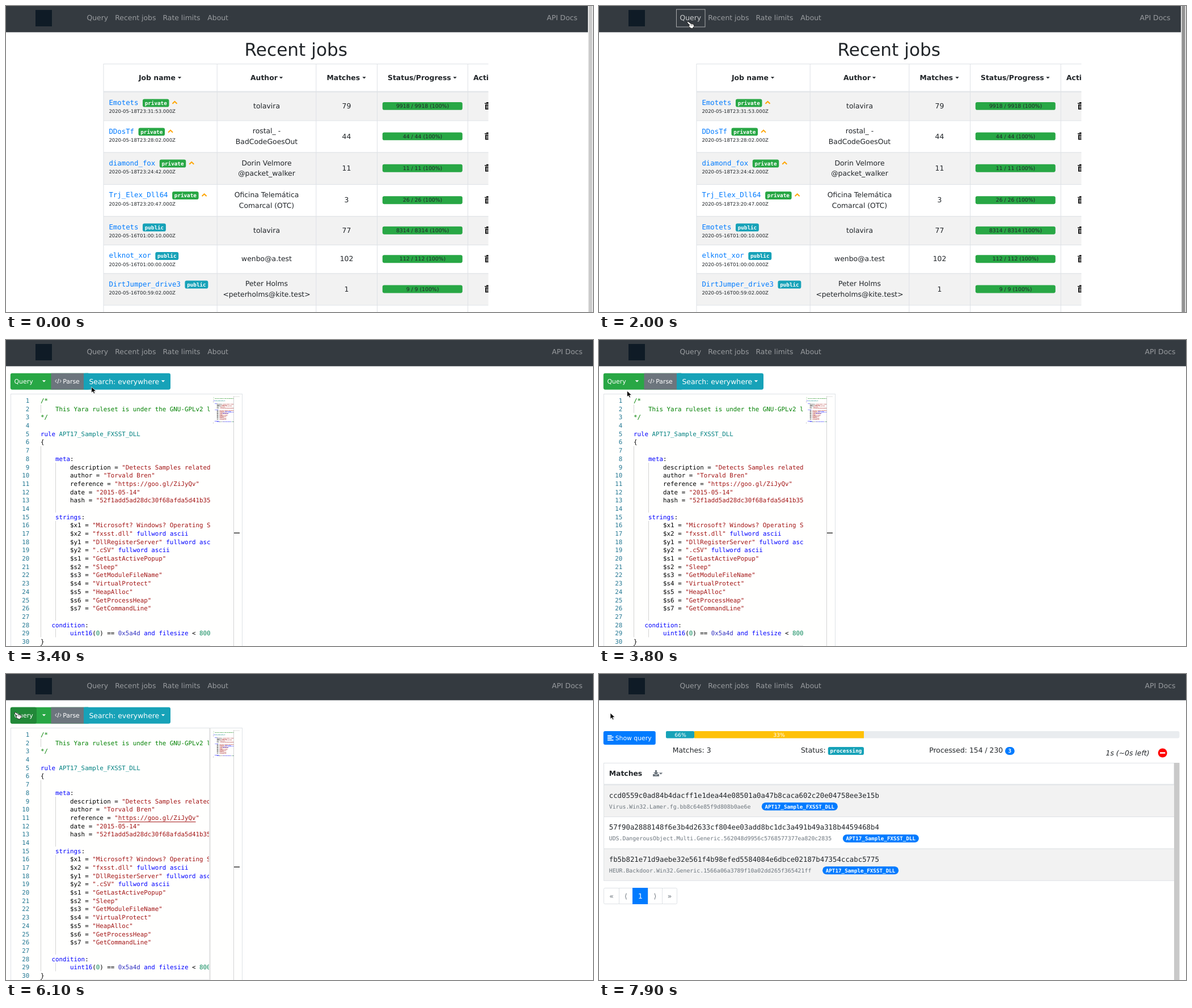
Animation of 1035x541 px, one loop 8 s. Source, as an HTML page:

```html
<!DOCTYPE html>
<html lang="en">
<head>
<meta charset="utf-8">
<title>Query demo</title>
<style>
html, body { margin: 0; width: 100%; height: 100%; overflow: hidden; background: #fff; }
svg { display: block; width: 1035px; height: 541px; }
text { font: 12.4px "DejaVu Sans", sans-serif; fill: #212529; text-rendering: geometricPrecision; }
.b, .map text { font-weight: bold; }
.i { font-style: italic; }
.m { font-family: "DejaVu Sans Mono", monospace; }
.c { text-anchor: middle; }
.e { text-anchor: end; }
.code { font-size: 10.82px; }
</style>
</head>
<body>
<svg id="stage" viewBox="0 0 1035 541"></svg>
<script>
const GREEN = '#28a745', TEAL = '#17a2b8', BLUE = '#007bff', GREY = '#6c757d', LINE = '#dee2e6';
const MONO = 0.602; // advance of the monospaced font, in em

const esc = s => String(s).replace(/&/g, '&amp;').replace(/</g, '&lt;').replace(/>/g, '&gt;');
const rect = (x, y, w, h, fill, r = 0, more = '') =>
  `<rect x="${x}" y="${y}" width="${w}" height="${h}" fill="${fill}" rx="${r}" ${more}/>`;
const text = (x, y, s, cls = '', size = 12.4, fill = '#212529') =>
  `<text x="${x}" y="${y}" class="${cls}" style="font-size:${size}px;fill:${fill}">${esc(s)}</text>`;
const path = (d, fill, stroke = 'none', width = 1) =>
  `<path d="${d}" fill="${fill}" stroke="${stroke}" stroke-width="${width}"/>`;
const caret = (x, y, fill = '#212529') => path(`M${x - 3.2} ${y}h6.4l-3.2 3.2z`, fill);
const group = (id, body, more = '') => `<g id="${id}" ${more}>${body}</g>`;

const tag = (x, y, s, fill, pad, r) =>
  rect(x, y - 10.2, s.length * 9.28 * MONO + 2 * pad, 13.9, fill, r) + text(x + pad, y, s, 'm b', 9.28, '#fff');
const badge = (x, y, s, fill) => tag(x, y, s, fill, 3.7, 3.1);
const pill = (x, y, s) => tag(x, y, s, BLUE, 5.6, 7);

// Jobs page
const jobs = [
  ['Emotets', 'private', '2020-05-18T23:31:53.000Z', ['tolavira'], 79, 9918],
  ['DDosTf', 'private', '2020-05-18T23:28:02.000Z', ['rostal_ -', 'BadCodeGoesOut'], 44, 44],
  ['diamond_fox', 'private', '2020-05-18T23:24:42.000Z', ['Dorin Velmore', '@packet_walker'], 11, 11],
  ['Trj_Elex_Dll64', 'private', '2020-05-18T23:20:47.000Z', ['Oficina Telemática', 'Comarcal (OTC)'], 3, 26],
  ['Emotets', 'public', '2020-05-16T01:00:10.000Z', ['tolavira'], 77, 8314],
  ['elknot_xor', 'public', '2020-05-16T01:00:00.000Z', ['wenbo@a.test'], 102, 112],
  ['DirtJumper_drive3', 'public', '2020-05-16T00:59:02.000Z', ['Peter Holms', '<peterholms@kite.test>'], 1, 9]
];
const rowTops = [151.5, 202.3, 258.5, 315, 371.5, 422, 472.5, 528.5];

function jobRow([name, kind, date, author, matches, total], i) {
  const top = rowTops[i], height = rowTops[i + 1] - top, mid = top + height / 2 - 0.4, y = top + 23.3;
  const badgeX = 181.4 + (name.length + 1) * 12.37 * MONO;
  const end = badgeX + kind.length * 9.28 * MONO + 7.4;
  return rect(172, top, 679, height, i % 2 ? '#fff' : '#f2f2f2') + rect(172, top, 679, 1, LINE) +
    text(181.4, y, name, 'm', 12.37, BLUE) +
    badge(badgeX, y, kind, kind === 'private' ? GREEN : TEAL) +
    (kind === 'private' ? path(`M${end + 6} ${y - 2}l4-4 4 4`, 'none', '#ffa500', 2) : '') +
    text(181.4, y + 14.3, date, '', 8.5) +
    author.map((s, k) => text(459.5, mid + 4.6 + (k - (author.length - 1) / 2) * 18.6, s, 'c')).join('') +
    text(600.5, mid + 4.6, matches, 'c') +
    rect(663.8, mid - 6.6, 141, 13.9, GREEN, 3.1) +
    text(734.5, mid + 3.6, `${total} / ${total} (100%)`, 'c', 9.3) +
    path(`M844 ${mid - 5}h3v-1.5h5v1.5h4v1.5h-12zM845 ${mid - 2.5}h10v9h-10z`, '#111') +
    rect(847, mid - 1, 1, 6, '#eee') + rect(849.3, mid - 1, 1, 6, '#eee');
}

const jobsPage = text(511.3, 88, 'Recent jobs', 'c', 31.2) +
  `<clipPath id="tableClip"><rect x="171" y="102" width="679.5" height="439"/></clipPath>` +
  group('table',
    jobs.map(jobRow).join('') +
    [102, 150.5, 528.5].map(y => rect(172, y, 679, 1, LINE)).join('') +
    [171.5, 371.7, 546.3, 654, 813.8].map(x => rect(x, 102, 1, 439, LINE)).join('') +
    [['Job name', 234, 306], ['Author', 431, 485], ['Matches', 565.5, 631.5],
      ['Status/Progress', 673, 791.5], ['Action', 824, 900]]
      .map(([s, x, cx]) => text(x, 130.6, s, 'b') + caret(cx, 125.3)).join(''),
    'clip-path="url(#tableClip)"') +
  rect(1026, 0, 9, 541, '#f1f1f1') +
  rect(1027.5, 0, 6, 541, '#c9c9c9', 0, 'id="thumb"');

// Query page
const source = `/*
    This Yara ruleset is under the GNU-GPLv2 license (http://www.gnu.org/licenses)
*/

rule APT17_Sample_FXSST_DLL
{

    meta:
        description = "Detects Samples related to APT17 activity"
        author = "Torvald Bren"
        reference = "https://goo.gl/ZiJyQv"
        date = "2015-05-14"
        hash = "52f1add5ad28dc30f68afda5d41b354533d8bce3"

    strings:
        $x1 = "Microsoft? Windows? Operating System" fullword
        $x2 = "fxsst.dll" fullword ascii
        $y1 = "DllRegisterServer" fullword ascii
        $y2 = ".cSV" fullword ascii
        $s1 = "GetLastActivePopup"
        $s2 = "Sleep"
        $s3 = "GetModuleFileName"
        $s4 = "VirtualProtect"
        $s5 = "HeapAlloc"
        $s6 = "GetProcessHeap"
        $s7 = "GetCommandLine"

   condition:
        uint16(0) == 0x5a4d and filesize < 800KB and all of them
}`.split('\n');
const PITCH = 14.69, CHAR = 10.82 * MONO;
const token = /("[^"]*")|\b(rule|meta|strings|condition|fullword|ascii|uint16|and|filesize|all|of|them)\b|(APT17_\w+)|(0x\w+)|\b(\d+)/g;
const tokenColors = ['#a31515', '#0000ff', '#008080', '#3030c0', '#09885a'];

function highlight(line) {
  let out = '', last = 0;
  for (const m of line.matchAll(token)) {
    const color = tokenColors[m.slice(1).findIndex(Boolean)];
    out += esc(line.slice(last, m.index)) + `<tspan style="fill:${color}">${esc(m[0])}</tspan>`;
    last = m.index + m[0].length;
  }
  return out + esc(line.slice(last));
}
const codeText = source.map((line, i) => {
  const body = line.trimStart(), indent = line.length - body.length, comment = i < 3;
  return `<text class="m code" x="${indent * CHAR}" y="${i * PITCH}" style="fill:${comment ? '#008000' : '#000'}">${comment ? esc(body) : highlight(body)}</text>`;
}).join('');
const guide = (x, from, to) => rect(x, 99.5 + (from - 1) * PITCH, 1, (to - from + 1) * PITCH, '#d3d3d3');

const queryPage =
  rect(7.8, 58.7, 140, 29, GREEN, 3.1) + rect(7.8, 58.7, 46.2, 29, '#218838', 3.1, 'id="hover"') +
  rect(137, 58.7, 153, 29, TEAL, 3.1) + rect(137, 58.7, 8, 29, TEAL) + rect(79.5, 58.7, 57.5, 29, GREY) +
  text(14.5, 77, 'Query', '', 10.9, '#fff') + caret(67, 71.3, '#fff') +
  path('M89.3 70l-2.500 2.700 2.500 2.700M94.700 70l2.500 2.700-2.500 2.700M93 68.500l-2 8.500'.replace(/00\b/g, ''), 'none', '#fff', 1) +
  text(100.2, 77, 'Parse', '', 10.9, '#fff') +
  text(146.5, 77.5, 'Search: everywhere', '', 12.4, '#fff') + caret(277, 71.3, '#fff') +
  rect(8.5, 95.5, 408, 460, '#fffffe', 0, `stroke="${LINE}"`) +
  rect(401, 99, 1, 442, '#d4d4d4') + rect(402, 99.5, 10, 1, '#e2e2e2') +
  group('firstNumber', text(34.5, 111, 1, 'm e', 10.82, '#237893')) +
  `<clipPath id="codeClip"><rect x="60" y="96" width="300" height="445"/></clipPath>
   <clipPath id="mapClip"><rect x="363" y="96" width="38.5" height="60"/></clipPath>` +
  group('code',
    source.map((_, i) => text(41.2, 111 + i * PITCH, i + 1, 'm e', 10.82, '#237893')).join('') +
    guide(61, 2, 2) + guide(61, 7, 29) + guide(87, 9, 14) + guide(87, 16, 27) + guide(87, 29, 29) +
    `<g clip-path="url(#codeClip)"><g transform="translate(61 111)">${codeText}</g></g>` +
    `<g clip-path="url(#mapClip)"><g class="map" transform="translate(365.5 102) scale(.119 .105)">${codeText.repeat(2)}</g></g>` +
    rect(61, 540, 299, 1, '#e8e8e8') + rect(61, 540, 2, 1, '#000', 0, 'id="textCaret"') +
    rect(402, 340.5, 10, 1.5, '#333') +
    group('late', rect(61 + 21 * CHAR, 261, 21 * CHAR, 1, '#a31515') +
      rect(358, 96, 1, 445, '#eee') + rect(359, 96, 1.5, 445, '#ddd')));

// Results page
const hits = [
  ['ccd0559c0ad84b4dacff1e1dea44e08501a0a47b8caca602c20e04758ee3e15b', 'Virus.Win32.Lamer.fg.bb8c64e85f9d808b0ae6e'],
  ['57f90a2888148f6e3b4d2633cf804ee03add8bc1dc3a491b49a318b4459468b4', 'UDS.DangerousObject.Multi.Generic.562048d9956c5768577377ea820c2835'],
  ['fb5b821e71d9aebe32e561f4b98efed5584084e6dbce02187b47354ccabc5775', 'HEUR.Backdoor.Win32.Generic.1566a06a3789f10a02dd265f365421ff']
];
const hitRow = ([hash, name], i) => {
  const y = 195.5 + i * 56.5;
  return rect(8, y, 1006, 56.5, i % 2 ? '#fff' : '#f2f2f2') + rect(8, y, 1006, 1, LINE) +
    text(17.7, y + 23.3, hash, 'm', 12.37) +
    text(17.7, y + 42, name, 'm', 9.9, GREY) +
    pill(36.5 + name.length * 9.9 * MONO, y + 42, 'APT17_Sample_FXSST_DLL');
};
const pageEdges = [8, 35, 59, 86, 111, 137];
const pager = [...'«⟨1⟩»'].map((s, i) => {
  const x = pageEdges[i], w = pageEdges[i + 1] - x, on = s === '1';
  return rect(x + 0.5, 378.5, w, 28, on ? BLUE : '#fff', i % 4 ? 0 : 2, `stroke="${on ? BLUE : LINE}"`) +
    text(x + w / 2 + 0.5, 397, s, 'c', 12.4, on ? '#fff' : GREY);
}).join('');

const resultsPage =
  rect(7.8, 101, 92, 24, BLUE, 3) +
  [0, 1, 2, 3].map(i => rect(15, 108 + i * 2.7, i % 2 ? 10.5 : 7.5, 1.6, '#fff')).join('') +
  text(28.7, 116.8, 'Show query', '', 10.83, '#fff') +
  rect(118, 101, 905.5, 12.5, '#e9ecef', 3) + group('progress', '') +
  '<circle cx="993.7" cy="139.5" r="8" fill="#f00"/>' + rect(989, 138.2, 9.4, 2.6, '#fff', 0.5) +
  rect(8.5, 157.5, 1005.5, 38, '#fff', 0, `stroke="${LINE}"`) + rect(8, 194.5, 1006, 1.3, LINE) +
  text(17.7, 180, 'Matches', 'b') +
  path('M99 170h3v4h3l-4.5 4.5-4.5-4.5h3zM95 177h3l2.5 2.5 2.5-2.5h3v4h-11z', GREY) + caret(109, 174.5, GREY) +
  group('hits', hits.map(hitRow).join('') + rect(8, 196, 1, 169, LINE) + rect(8, 364.8, 1006, 1, LINE) + pager) +
  rect(1014, 157, 9.5, 384, '#c9c9c9');

function progress(t) {
  const started = t >= 6900, done = t >= 7900, teal = done ? 50 : 0;
  let out = '';
  if (started) out += rect(118 + teal, 101, 299, 12.5, '#ffc107') + text(267.5 + teal, 110.6, '33%', 'c', 9.3, '#fff');
  if (done) out += rect(118, 101, teal, 12.5, TEAL, 2) + text(143.5, 110.6, '66%', 'c', 9.3, '#fff');
  else out += text(118, 110.6, '0%', '', 9.3, '#fff');
  out += text(129.7, 139.3, 'Matches:' + (started ? done ? ' 3' : ' 0' : '')) +
    text(356, 139.3, 'Status:') +
    text(582.3, 139.3, 'Processed: ' + (started ? (done ? 154 : 0) + ' / 230' : '-'));
  if (started) out += badge(403.8, 139.3, 'processing', TEAL) + pill(done ? 716 : 700, 139.3, '3') +
    text(970.5, 143.8, done ? '1s (~0s left)' : (t < 7500 ? '0s' : '1s') + ' (? left)', 'e i');
  return out;
}

// The jobs page keeps its scrollbar beside the bar
const nav = rect(0, 0, 1035, 46.4, '#343a40', 0, 'id="bar"') + rect(52, 7, 29, 29, '#0f1b26') +
  [['Query', 142.5], ['Recent jobs', 192.3], ['Rate limits', 276.5], ['About', 355.3]]
    .map(([s, x], i) => group('link' + i, text(x, 25.3, s, '', 12.4, 'inherit'))).join('') +
  group('apiLink', text(1016.5, 25.3, 'API Docs', 'e', 12.4, 'inherit')) +
  rect(136.5, 6, 50.5, 31, 'none', 0, 'id="focus" stroke="#a9abad"');

const pointers =
  group('arrow', path('M0 0V10.5L2.5 8.3 4.2 12 6 11.2 4.4 7.6H8Z', '#000', '#fff', 0.7)) +
  group('hand', path('M.5 1.5Q1.5 0 3 1L7 4.2 11 4.5 13 8.5 9.5 13 5.5 11.5 2.5 7.5 5 7 1 3Z', '#fff', '#111', 0.9) +
    path('M6 5.5l2.5 2.5M8.5 5l2 2.5', 'none', '#111', 0.7));

const stage = document.getElementById('stage');
stage.innerHTML = group('jobs', jobsPage) + group('query', queryPage) + group('results', resultsPage) +
  group('nav', nav, 'fill="#999c9f"') + group('pointer', pointers);

const $ = id => document.getElementById(id);
const show = (id, on) => { $(id).style.display = on ? '' : 'none'; };

// Pointer route: time, x, y
const route = [[100, 552, 528], [900, 324, 305], [1800, 155, 27], [2000, 155, 27], [2400, 176, 81],
  [3300, 176, 81], [3800, 49.5, 90], [4200, 45, 88], [4600, 14, 65], [5100, 14.5, 67], [7400, 14.5, 67.5], [7700, 20, 69]];
function pointerAt(t) {
  const k = route.findIndex(p => p[0] > t);
  if (k < 1) return route[k < 0 ? route.length - 1 : 0].slice(1);
  const [t0, x0, y0] = route[k - 1], [t1, x1, y1] = route[k], u = (t - t0) / (t1 - t0);
  return [x0 + (x1 - x0) * u, y0 + (y1 - y0) * u];
}

let shown = -1;
function frame(now) {
  const t = Math.floor(now % 8000 / 100) * 100;
  if (t !== shown) draw(shown = t);
  requestAnimationFrame(frame);
}

function draw(t) {
  const between = (a, b) => t >= a && t < b;
  const onJobs = t < 2100;
  show('jobs', onJobs);
  show('query', between(2100, 6700));
  show('results', t >= 6700);
  show('firstNumber', t < 3400);
  show('code', t >= 3400);
  show('late', t >= 4000);
  show('hover', between(4300, 6700));
  show('textCaret', !between(5400, 5900));
  show('hits', t >= 7900);
  show('focus', between(1900, 3400));
  $('thumb').setAttribute('fill', t < 1900 ? '#c9c9c9' : '#929292');
  $('bar').setAttribute('width', onJobs ? 1026 : 1035);
  for (const id of ['link0', 'link1', 'link2', 'link3', 'apiLink']) $(id).firstChild.style.fill = '#999c9f';
  if (between(1800, 3400)) $('link0').firstChild.style.fill = '#cccecf';
  $('apiLink').setAttribute('transform', `translate(${onJobs ? -9 : 0})`);
  $('progress').innerHTML = progress(t);
  const hand = between(1800, 3400) || between(4300, 6700);
  show('pointer', t >= 100);
  show('arrow', !hand);
  show('hand', hand);
  $('pointer').setAttribute('transform', `translate(${pointerAt(t)})`);
}
requestAnimationFrame(frame);
</script>
</body>
</html>
```
